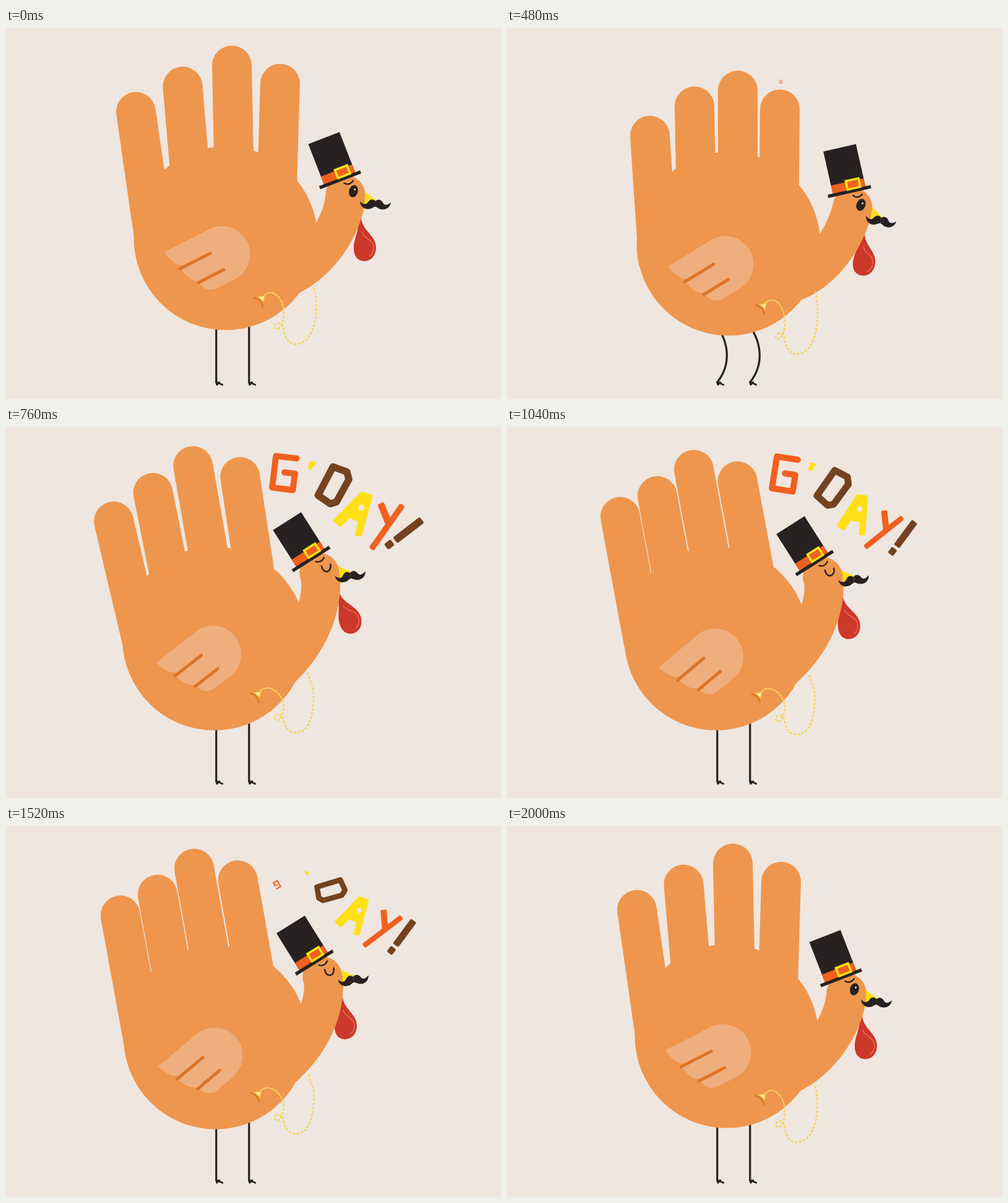
An HTML page with a canvas that plays this animation: 800 by 600 pixels, repeating every 2.12 s.

```html
<!DOCTYPE html>
<html lang="en">
<head>
<meta charset="utf-8">
<title>Hand turkey says hello</title>
<style>
html, body { margin: 0; width: 100%; height: 100%; overflow: hidden; background: #eee6df; }
canvas { display: block; width: 800px; height: 600px; }
</style>
</head>
<body>
<canvas id="stage" width="800" height="600"></canvas>
<script>
const g = document.getElementById('stage').getContext('2d');
const LOOP = 2120, STEP = 40, RAD = Math.PI / 180;
const BG = '#eee6df', SKIN = '#ee964d', INK = '#272221', ORANGE = '#f0601f',
  YELLOW = '#ffe017', BROWN = '#74421f', RUST = '#de7427';

// ---- timing ----
const phase = (t, a, b) => Math.min(1, Math.max(0, (t - a) / (b - a)));
const cubic = u => u < .5 ? 4 * u ** 3 : 1 - 4 * (1 - u) ** 3;
const sine = u => .5 - .5 * Math.cos(Math.PI * u);
const relax = u => 1 - (1 - u ** 2.5) ** 10;
const PEAK = .9375;

// Progress of the four moves; "back" is how long the return takes.
function weights(t, back = 400) {
  return [
    cubic(phase(t, 240, 480)),
    cubic(phase(t, 480, 640)),
    sine(phase(t, 640, 840)),
    relax(phase(t, 1480, 1480 + back))
  ];
}

// Loose parts settle later than the body.
function lateWeights(t) {
  const w = weights(t);
  return [w[0], w[1], sine(phase(t, 640, 960)), sine(phase(t, 1520, 2000))];
}

// Blend rest, crouch, stretch and hold.
function mix([rest, crouch, stretch, hold], [a, b, c, d]) {
  const top = crouch + (stretch - crouch) / PEAK;
  return rest + (crouch - rest) * a + (top - crouch) * b + (hold - top) * c + (rest - hold) * d;
}

function keyed(keys, t) {
  for (let i = 1; i < keys.length; i++) {
    const [t0, v0] = keys[i - 1], [t1, v1] = keys[i];
    if (t < t1) return v0 + (v1 - v0) * (t - t0) / (t1 - t0);
  }
  return keys[keys.length - 1][1];
}

// ---- drawing helpers ----
const shape = d => new Path2D(d);

function fill(path, color) {
  g.fillStyle = color;
  g.fill(path);
}

function line(path, color, width, cap = 'round') {
  g.strokeStyle = color;
  g.lineWidth = width;
  g.lineCap = cap;
  g.lineJoin = 'round';
  g.stroke(path);
}

function at(x, y, deg, draw) {
  g.save();
  g.translate(x, y);
  g.rotate(deg * RAD);
  draw();
  g.restore();
}

// Bar with slightly rounded corners between two points.
function bar(x1, y1, x2, y2, w, color) {
  const len = Math.hypot(x2 - x1, y2 - y1);
  at(x1, y1, Math.atan2(y2 - y1, x2 - x1) / RAD, () => {
    g.fillStyle = color;
    g.beginPath();
    g.roundRect(0, -w / 2, len, w, 2.5);
    g.fill();
  });
}

function turn(x, y, deg) {
  const c = Math.cos(deg * RAD), s = Math.sin(deg * RAD);
  return [x * c - y * s, x * s + y * c];
}

// ---- pose tracks: rest, crouch, stretch, hold ----
const FINGERS = [
  { x: [210, 231, 162, 183], y: [135.5, 174, 167.5, 145], a: [8.2, 3.8, 17.6, 10.5], len: 209, back: 295 },
  { x: [285.5, 303, 232, 243], y: [94.5, 126.5, 98.5, 111.5], a: [4.9, 1.1, 12.2, 10.5], len: 170, back: 340 },
  { x: [365, 373, 307, 302], y: [60.5, 101, 54.5, 69], a: [1.2, 0, 8.5, 10.5], len: 190, back: 390 },
  { x: [443, 441, 392.5, 372.5], y: [90, 131.5, 71.5, 87.5], a: [-1.7, -.5, 4.7, 10.5], len: 190, back: 400 }
];
const BODY = { x: [355, 358, 335.5, 338], y: [340, 349, 343, 342], r: 148.5 };
const HEAD = { x: [540, 553.5, 490, 497], y: [245.5, 264.5, 205, 220], a: [0, 8.5, -10, -11.3] };
const NECK = { inner: [0, 3.5, -15, -12], outer: [0, 1.3, -9, -7.7] };
const WING = { x: [349, 353, 333, 336.5], y: [366, 382, 366, 371.5], a: [-27, -31.5, -36.7, -40] };
const POCKET = { x: [0, 1, -6, -6], y: [0, 12, -6, -4.5] };
const CHAIN = { loop: [0, 16, -14, -11], low: [0, 16, -20, -14], x: [0, 1, -11, -9], y: [0, 10, -25, -17] };
const WATTLE_TURN = [0, 8, -17, -5];

// ---- turkey ----
function legs(bend) {
  for (const x of [339.8, 392.8]) {
    line(shape(`M${x - 2 * bend},480 C${x + 20 * bend},510 ${x + 22 * bend},545 ${x},573`), INK, 3.2);
    line(shape(`M${x},572.5 L${x + 10},577 M${x},573 L${x + 1},577 L${x + 5},573`), INK, 2.8);
  }
}

function finger(f, t) {
  const w = weights(t, f.back);
  at(mix(f.x, w), mix(f.y, w), -mix(f.a, w), () => {
    g.fillStyle = SKIN;
    g.beginPath();
    g.arc(0, 0, 32, Math.PI, 0);
    g.lineTo(32, f.len);
    g.lineTo(-32, f.len);
    g.fill();
  });
}

const WATTLE = shape('M0,-3 C1,19 24,26 24,46 C24,59 16,68 5,68 C-6,68 -12,59 -12,48 C-12,32 -6,27 -4,6 Z');
const SHINE = shape('M1,21 C6,34 20,32 20,46 C20,53 16,58 13,60');

function wattle(x, y, deg) {
  at(x, y, deg, () => {
    fill(WATTLE, '#cc3829');
    line(SHINE, '#e4604f', 2);
  });
}

const FEATHERS = shape('M-81,-45.5 H0 A45.5,45.5 0 0 1 0,45.5 H-32 C-46,45 -53,35 -54,23' +
  ' L-53,21.5 C-62,18 -68,6 -70,-9 L-62,-11 C-74,-16 -80,-30 -81,-45.5 Z');
const BARS = shape('M-71,-10 H-16 M-55,23.5 H-9');

function wing(x, y, deg) {
  at(x, y, deg, () => {
    fill(FEATHERS, '#efae7e');
    line(BARS, RUST, 5);
  });
}

function pocket(dx, dy) {
  at(dx, dy, 0, () => {
    fill(shape('M404,435.5 L419,432 L417,446 Q412,437 404,435.5 Z'), '#f0bb2c');
    fill(shape('M408,435.5 L417,434 L415.5,442 Q412,437 408,435.5 Z'), '#fbf0b4');
    line(shape('M401.5,436 Q412,438.5 415,450.5'), RUST, 2.4);
  });
}

function chain(px, py, w) {
  const l = mix(CHAIN.loop, w), b = mix(CHAIN.low, w), ex = mix(CHAIN.x, w), ey = mix(CHAIN.y, w);
  const side = 501.5 + ex * .45;
  const path = shape(`M${417 + px},${433 + py} C${428 + px},${419 + py} ${449 + px / 2},${434 + py} 449,${462 + l}` +
    ` C449,${472 + l} 446,${481 + l} 441,${486 + l} C435,${490 + l} 431,${481 + l} 438,${478 + l}` +
    ` C444,${476 + l} 448,${480 + l} 449,${489 + l} C451,${503 + b} 458,${511.5 + b} 469,${511.5 + b}` +
    ` C492,${510 + b} ${side},${480 + b} ${side},${452 + ey}` +
    ` C${side},${438 + ey} ${500 + ex},${428 + ey} ${497 + ex},${417 + ey}`);
  line(path, '#fbeec2', .9);
  g.setLineDash([4, 2.6]);
  line(path, '#f8d24a', 2.3, 'butt');
  g.setLineDash([]);
}

function hat() {
  at(540, 245.5, -21.2, () => {
    g.fillStyle = INK;
    g.fillRect(-27, -72.5, 54, 72);
    g.fillStyle = ORANGE;
    g.fillRect(-27, -16, 54, 14);
    g.fillStyle = INK;
    g.fillRect(-35.5, -2.7, 71, 5.4);
    g.fillStyle = ORANGE;
    g.fillRect(-3, -18, 22, 15);
    g.strokeStyle = YELLOW;
    g.lineWidth = 3.6;
    g.lineJoin = 'miter';
    g.strokeRect(-2.2, -17.7, 21, 14);
  });
}

function eye(t) {
  line(shape('M546.5,251 Q555,255.5 561,247'), INK, 2.3);
  if (t >= 640 && t < 1560) {
    line(shape('M554.3,260 C554,274 569,274 569,260'), INK, 2.5);
    return;
  }
  const lid = t < 1000 ? phase(t, 520, 600) : 1 - phase(t, 1520, 1640);
  at(561.5, 264 + 8 * lid, 14, () => {
    const s = 1 - .5 * lid;
    g.fillStyle = INK;
    g.beginPath();
    g.ellipse(0, 0, 7.2, 10 * s, 0, 0, 7);
    g.fill();
    g.fillStyle = '#fff';
    g.beginPath();
    g.ellipse(1.5, -3.2 * s, 1.3, 1.4 * s, 0, 0, 7);
    g.fill();
  });
}

function beak(m) {
  const tip = `${601 + 7 * m},${280 + 11 * m}`;
  fill(shape(`M${577 + 4 * m},${263 + 11 * m} L${tip} L${576 + 2 * m},${295 + 6 * m} Z`), YELLOW);
  if (m > .1) line(shape(`M586,288.5 L${tip}`), '#c9a312', 2);
}

const WHISKER = shape('M0,-5 C4,-9 9,-8 12,-3 C15,2 20,1 25,-4 C24,5 17,9 10,8 C5,7.5 3,4 0,4 Z');

function mustache(open) {
  at(597 + 2 * open, 285 - 10 * open, 2, () => {
    fill(WHISKER, INK);
    g.scale(-1, 1);
    fill(WHISKER, INK);
  });
}

function turkey(t) {
  const w = weights(t), quick = weights(t, 340), late = lateWeights(t);
  const bx = mix(BODY.x, w), by = mix(BODY.y, w);
  const hx = mix(HEAD.x, w), hy = mix(HEAD.y, w), ha = mix(HEAD.a, quick);
  const open = phase(t, 480, 560) * (1 - phase(t, 640, 760));
  const onHead = (x, y) => {
    const [dx, dy] = turn(x - 540, y - 245.5, ha);
    return [hx + dx, hy + dy];
  };
  const onBody = (x, y, a) => {
    const [dx, dy] = turn(x, y, a);
    return [bx + dx, by + dy];
  };
  const inHead = draw => at(hx, hy, ha, () => {
    g.translate(-540, -245.5);
    draw();
  });

  legs(Math.max(0, w[0] - w[1]));
  const u = phase(t, 1500, 2000);
  const swing = 24 * Math.sin(2 * Math.PI * u) * (1 - u);
  wattle(...onHead(574, 309), mix(WATTLE_TURN, late) + swing);
  inHead(() => beak(open));
  for (const f of FINGERS) finger(f, t);

  g.fillStyle = SKIN;
  g.beginPath();
  g.arc(bx, by, BODY.r, 0, 7);
  g.fill();

  const inA = mix(NECK.inner, w), outA = mix(NECK.outer, w);
  g.beginPath();
  g.moveTo(...onBody(146, -24, inA));
  g.quadraticCurveTo(...onBody(160, -50, inA), ...onHead(516.5, 270));
  g.arc(...onHead(548.5, 270), 32, Math.PI + ha * RAD, ha * RAD);
  g.bezierCurveTo(...onHead(580.5, 320), ...onBody(185, 55, inA), ...onBody(120, 88, outA));
  g.lineTo(bx + 60, by);
  g.fill();

  wing(mix(WING.x, quick), mix(WING.y, late), mix(WING.a, late));
  const px = mix(POCKET.x, w), py = mix(POCKET.y, w);
  pocket(px, py);
  chain(px, py, w);
  inHead(() => {
    eye(t);
    hat();
    mustache(open);
  });
}

// ---- lettering ----
const LETTERS = [
  { x: 449, y: 76, tilt: 9, draw() {
    line(shape('M17,-26 H-17 V26 H17 V-1 H0'), ORANGE, 10);
  } },
  { x: 493, y: 64, draw() {
    const p = shape('M-2,-6 L6,-3.5 L-1.5,6.5 L-5,4.5 Z');
    fill(p, YELLOW);
    line(p, YELLOW, 2);
  } },
  { x: 528, y: 99.5, tilt: 35, draw() {
    line(shape('M-15.5,-25 L7.5,-28 L15.5,-19 L14.5,21 L7.5,28 L-15.5,25 Z'), BROWN, 11);
  } },
  { x: 558, y: 142, out: [-5, 15], draw() {
    const p = shape('M8,-32 L24,-30 L20,32 L12,32 L13,11 L-3,8 L-13,24 L-24,18 Z');
    fill(p, YELLOW);
    line(p, YELLOW, 2.5);
    g.fillStyle = BG;
    g.beginPath();
    g.arc(12, -9.5, 4.4, 0, 7);
    g.fill();
  } },
  { x: 609, y: 166, draw() {
    bar(30.5, -20, -30.5, 29, 8.5, ORANGE);
    bar(.5, -31, 4, 2, 10, ORANGE);
  } },
  { x: 640, y: 179, draw() {
    bar(19, -26, -10.5, 14, 11, BROWN);
    bar(-13.5, 17.5, -20.5, 27, 10.5, BROWN);
  } }
];
const GROW = [[0, 0], [40, .09], [80, .57], [120, 1.1], [160, 1.12], [240, 1.04], [320, .99], [400, 1]];
const DRIFT = [[0, .5], [40, .45], [80, .42], [120, -.3], [160, -.38], [280, -.1], [400, 0]];
const TILT = [[0, 0], [40, .2], [80, .4], [120, 1], [160, 1], [280, .2], [400, 0]];

function letters(t) {
  LETTERS.forEach((l, i) => {
    const age = t - 440 - 40 * i;
    if (age <= 0) return;
    const leave = cubic(phase(t, 1320 + 40 * i, 1640 + 40 * i));
    const size = keyed(GROW, age) * (1 - leave);
    if (size < .004) return;
    const [ox, oy] = l.out || [-14, 24];
    const move = keyed(DRIFT, age) + leave;
    const spin = keyed(TILT, age) * (i % 2 ? 16 : -16) + 180 * leave;
    at(l.x + ox * move, l.y + oy * move, (l.tilt || 0) + spin, () => {
      g.scale(size, size);
      l.draw();
    });
  });
}

function frame(now) {
  const t = Math.floor((now % LOOP) / STEP) * STEP;
  g.fillStyle = BG;
  g.fillRect(0, 0, 800, 600);
  turkey(t);
  letters(t);
}

const start = performance.now();
function tick() {
  frame(performance.now() - start);
  requestAnimationFrame(tick);
}
tick();
</script>
</body>
</html>
```
